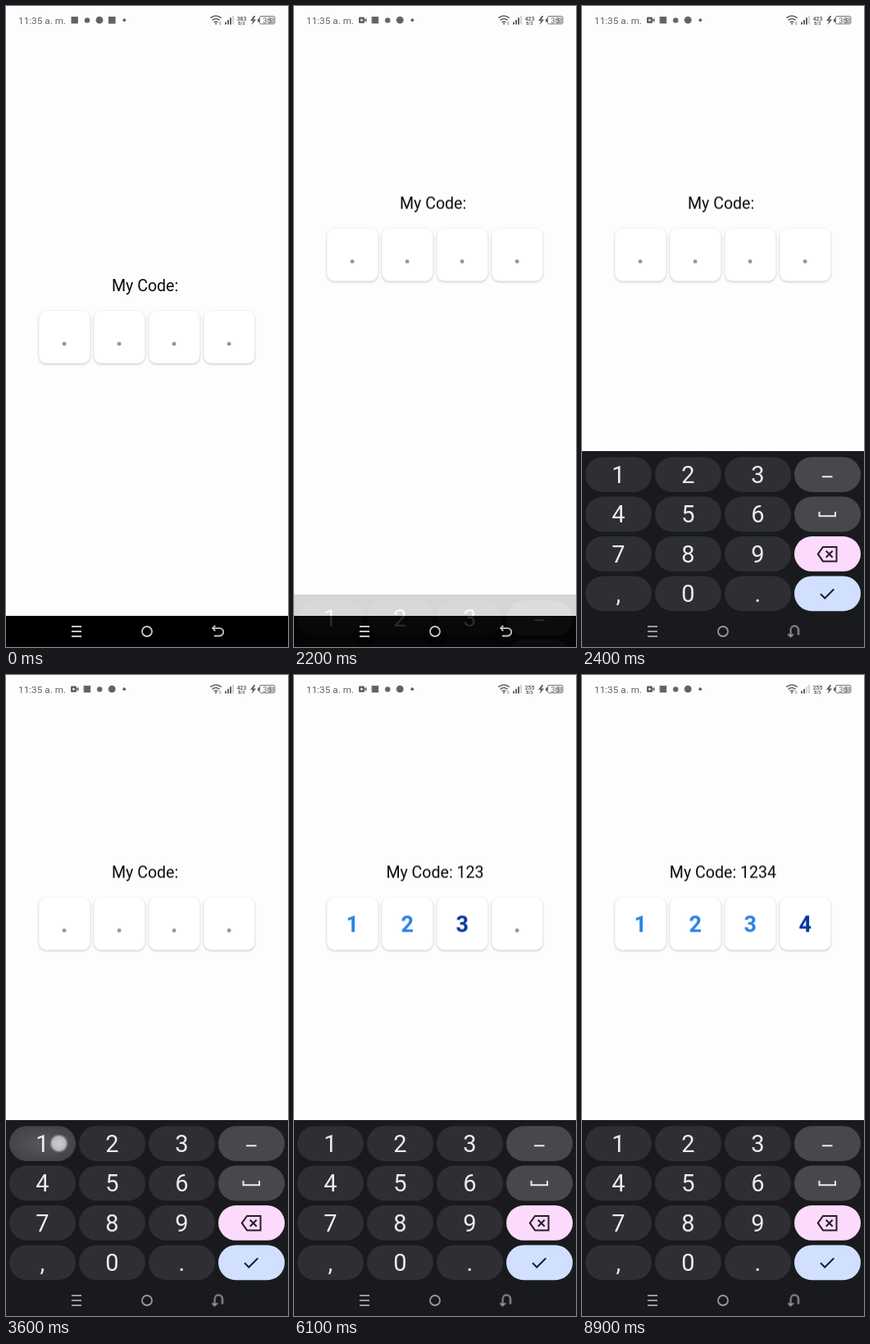
An HTML page that plays this animation: 344 px wide and 782 px high, repeating every 9400 ms.

```html
<!DOCTYPE html>
<html lang="es">
<head>
<meta charset="utf-8">
<title>Code entry</title>
<style>
  html, body { margin: 0; width: 100%; height: 100%; overflow: hidden; background: #fefdfe; }
  svg { display: block; width: 100%; height: 100%; font-family: Roboto, "Open Sans", sans-serif; }
  text { white-space: pre; }
  .mid { text-anchor: middle; }
  .line { fill: none; stroke-width: 2; }
  .status { fill: #626264; }
  .title { font-size: 19.6px; fill: #0a0a0a; }
  .digit { font-size: 27px; font-weight: 700; }
  .cell { fill: #fff; filter: drop-shadow(0 1.5px 1.6px rgba(0, 0, 0, .24)); }
  .key { font-size: 29px; fill: #ececee; }
  #back { transform-origin: 258.5px 763px; }
</style>
</head>
<body>
<svg viewBox="0 0 344 782">
  <defs>
    <radialGradient id="tap">
      <stop offset="0" stop-color="#d4d4d6" stop-opacity=".95"/>
      <stop offset=".7" stop-color="#c4c4c6" stop-opacity=".92"/>
      <stop offset=".86" stop-color="#8b8b8e" stop-opacity=".7"/>
      <stop offset="1" stop-color="#6c6c70" stop-opacity=".1"/>
    </radialGradient>
    <radialGradient id="press">
      <stop offset="0" stop-color="#fff" stop-opacity=".2"/>
      <stop offset="1" stop-color="#fff" stop-opacity=".11"/>
    </radialGradient>
  </defs>
  <rect width="344" height="782" fill="#fefdfe"/>

  <g class="status">
    <text x="15" y="21.7" font-size="11.8">11:35 a. m.</text>
    <g id="camera">
      <rect x="79" y="13.5" width="7" height="7.4" rx="1"/>
      <path d="M85.5 17.2l3-2.8v5.6z"/>
      <circle cx="82.5" cy="17.2" r="1.3" fill="#fefdfe"/>
    </g>
    <g id="apps">
      <rect x="79.5" y="13" width="8.4" height="8.4"/>
      <circle cx="99" cy="17.4" r="3.2"/>
      <circle cx="114" cy="17.2" r="4.4"/>
    </g>
    <rect id="lastApp" x="125" y="13" width="8.6" height="8.6"/>
    <circle cx="144.3" cy="17.2" r="1.9"/>

    <g class="line" stroke="#626264" style="stroke-width:1.5">
      <path d="M249.3 14.6q6.7-5.4 13.4 0M251.5 17.3q4.5-3.6 9 0M253.7 19.8q2.3-1.8 4.6 0"/>
    </g>
    <circle cx="256" cy="21.6" r="1.1"/>
    <text x="260" y="23" font-size="4.5">6</text>

    <path d="M267 19.5h2v3h-2zM270 17h2v5.5h-2z"/>
    <path d="M273 14.3h2v8.2h-2zM276 12h2v10.5h-2z" fill="#d0d0d2"/>
    <rect id="bar" x="273" y="14.3" width="2" height="8.2"/>
    <g id="speed" class="mid" font-size="6.6" font-weight="700"></g>
    <text class="mid" x="287.4" y="23" font-size="5" font-weight="700">B/S</text>

    <path d="M302.2 12l-4.2 6h3l-1.2 5 5.4-6.6h-3.2l2.2-4.4z"/>
    <rect x="307" y="15.5" width="2" height="4"/>
    <rect x="321" y="14" width="6.2" height="7" fill="#b4b4b6"/>
    <rect x="309.5" y="12.5" width="18.4" height="9.4" rx="1.5" fill="none" stroke="#737375"/>
    <text class="mid" x="318.5" y="20.6" font-size="9.4">36</text>
  </g>

  <g id="form"></g>
  <rect y="744" width="344" height="38"/>
  <g id="keyboard"><rect y="543" width="344" height="260" fill="#191a1e"/></g>
  <g id="nav" class="line" stroke="#c6c6c8" style="stroke-width:1.8">
    <path d="M80 757h12M80 763h12M80 769h12"/>
    <circle cx="172" cy="763" r="6"/>
    <path id="back" d="M255.3 755.8l-3.2 3.3 3.2 3.3M252.3 759.1h8.2a4.7 4.7 0 0 1 0 9.4h-6.5"/>
  </g>
  <g id="taps"></g>
</svg>

<script>
const LOOP = 9400;
const typed = [3700, 4900, 5900, 6900];
const $ = id => document.getElementById(id);

function add(parent, tag, attrs, text = '') {
  const el = document.createElementNS('http://www.w3.org/2000/svg', tag);
  for (const name in attrs) el.setAttribute(name, attrs[name]);
  el.textContent = text;
  parent.append(el);
  return el;
}

// Holds each property value from its time in ms until the next one.
function play(el, prop, steps) {
  const frames = Object.entries(steps).map(([ms, value]) =>
    ({ offset: ms / LOOP, [prop]: value, easing: 'steps(1, end)' }));
  if (frames.at(-1).offset < 1) frames.push({ ...frames.at(-1), offset: 1 });
  el.animate(frames, { duration: LOOP, iterations: Infinity });
}

const show = (el, from, to = LOOP) => play(el, 'opacity', { 0: 0, [from]: 1, [to]: 0 });

// Status bar
const shift = p => `translateX(${15.2 * p}px)`;
play($('apps'), 'transform', { 0: shift(0), 300: shift(.25), 400: shift(.5), 500: shift(.75), 600: shift(1) });
play($('camera'), 'opacity', { 0: 0, 300: .25, 400: .5, 500: .75, 600: 1 });
play($('lastApp'), 'opacity', { 0: 1, 300: .75, 400: .5, 500: .25, 600: 0 });
show($('bar'), 0, 7600);
[['383', 0, 1000], ['423', 1000, 6100], ['255', 6100]].forEach(([value, from, to]) =>
  show(add($('speed'), 'text', { x: 287.5, y: 18 }, value), from, to));

// Title and code cells
const form = $('form');
play(form, 'transform', { 0: 'translateY(0px)', 2200: 'translateY(-100.5px)' });
for (let n = 0; n <= 4; n++) {
  const title = add(form, 'text', { class: 'title mid', x: 172, y: 347.8 }, 'My Code: ' + '1234'.slice(0, n));
  show(title, n ? typed[n - 1] : 0, typed[n]);
}
typed.forEach((time, i) => {
  const x = 71.3 + 67 * i;
  add(form, 'rect', { class: 'cell', x: x - 31, y: 372, width: 62, height: 64, rx: 9 });
  show(add(form, 'circle', { cx: x - .2, cy: 412.2, r: 2.4, fill: '#959499' }), 0, time);
  const digit = fill => add(form, 'text', { class: 'digit mid', x, y: 414.2, fill }, i + 1);
  show(digit('#06389f'), time, typed[i + 1]);
  if (i < 3) show(digit('#2784e8'), typed[i + 1]);
});

// Keyboard
const board = $('keyboard');
const sideFills = ['#47484b', '#47484b', '#fcdafb', '#d0e0fe'];
const pill = (col, row, fill) => add(board, 'rect',
  { x: 4 + 85 * col, y: 550.2 + 48.4 * row, width: 81, height: 42.8, rx: 21.4, fill });
['123', '456', '789', ',0.'].forEach((keys, row) => {
  [...keys].forEach((key, col) => {
    pill(col, row, '#2d2f32');
    add(board, 'text', { class: 'key mid', x: 44.4 + 85 * col, y: 582 + 48.4 * row }, key);
  });
  pill(3, row, sideFills[row]);
});
const icon = (d, stroke) => add(board, 'path', { class: 'line', d, stroke });
icon('M293 574.3h12.5M289.5 617v5.2h19.5V617', '#ececee');
icon('M287.8 668.7l6.2-8.7h16.5v17.4H294zM297.7 664.7l8 8M305.7 664.7l-8 8', '#242027');
icon('M291 717.3l5.2 5.2 11-11', '#1c2028');

const drop = y => `translateY(${y}px)`;
play(board, 'opacity', { 0: 0, 2200: .18, 2300: 1 });
play(board, 'transform', { 0: drop(175), 2300: drop(15), 2400: drop(0) });
play($('nav'), 'stroke', { 0: '#c6c6c8', 2300: '#98999b' });
play($('back'), 'transform', { 0: 'rotate(0deg)', 2300: 'rotate(-90deg)' });

// Held keys light up
[[0, 3600], [1, 6800]].forEach(([row, time]) =>
  play(pill(0, row, 'url(#press)'), 'opacity', { 0: 0, [time]: 1, [time + 100]: .5, [time + 200]: 0 }));

// Touches: x, y, start, fade, end
[
  [90, 402, 1900, 2100, 2200],
  [64.5, 571.5, 3600, 3700, 3800],
  [136, 580.5, 4700, 4900, 5000],
  [226, 571, 5700, 5900, 6000],
  [60, 621, 6800, 6900, 7000],
  [302.5, 454.5, 8600, 8800, 8900]
].forEach(([cx, cy, start, fade, end]) =>
  play(add($('taps'), 'circle', { cx, cy, r: 11.8, fill: 'url(#tap)' }), 'opacity',
    { 0: 0, [start]: 1, [fade]: .5, [end]: 0 }));
</script>
</body>
</html>
```
